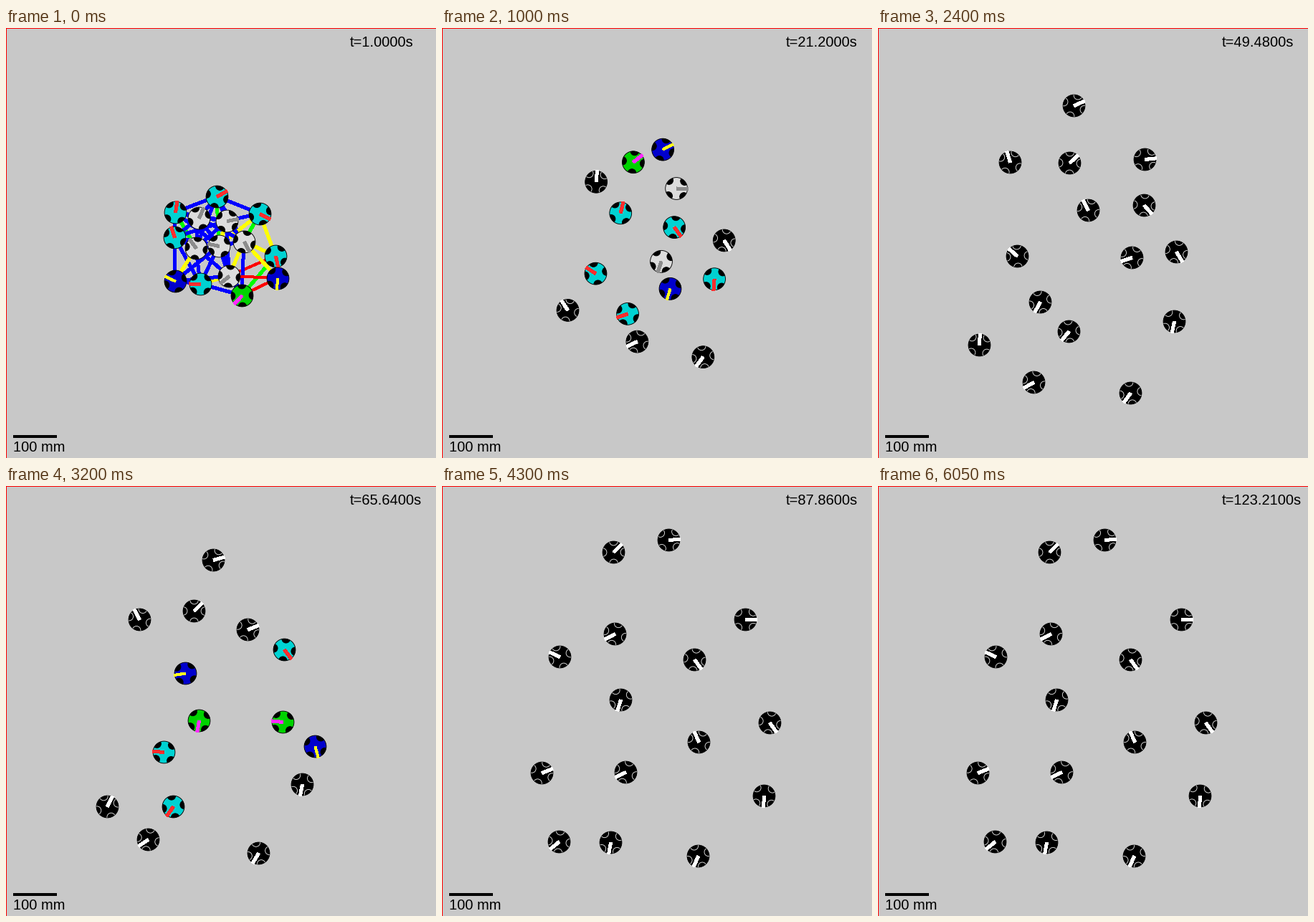
A matplotlib script for the animation above (6100 ms loop, 600x600 px).

```python
from itertools import combinations

import numpy as np
import matplotlib.pyplot as plt
from matplotlib.animation import FuncAnimation
from matplotlib.patches import Circle, Rectangle

SIZE, DPI = 600, 100
FRAMES, STEP_MS = 122, 50
PX = 72 / DPI
RADIUS, NOTCH = 15.4, 5.8
CENTRE = np.array([300, 300])
START_LEAD = -65
REACH = 79
TIMES = [0, 29, 48, 64, 86]
STATE_ENDS = [6, 20, 39, 56, 75]


def rgb(r, g, b):
    return r / 255, g / 255, b / 255


# state: body colour, heading colour, heading width
STYLE = {
    "C": (rgb(0, 210, 210), rgb(255, 45, 45), 4),
    "B": (rgb(0, 0, 205), rgb(255, 255, 30), 3),
    "G": (rgb(0, 210, 0), rgb(255, 45, 255), 4),
    "W": (rgb(220, 220, 220), rgb(140, 140, 140), 4),
    "K": (rgb(0, 0, 0), rgb(255, 255, 255), 4),
}


class Bot:
    """Walks through a few points, turned by a lead from its outward bearing."""

    def __init__(self, states, lead, *points):
        self.states, self.lead = states, lead
        self.track = np.array(points).T

    def at(self, k):
        return np.array([np.interp(k, TIMES, axis) for axis in self.track])

    def heading(self, k):
        dx, dy = self.at(k) - CENTRE
        lead = np.interp(k, [0, TIMES[-1]], [START_LEAD, self.lead])
        return np.arctan2(-dy, dx) + np.radians(lead)

    def state(self, k):
        return self.states[np.searchsorted(STATE_ENDS, k)]


bots = [
    Bot("CGBKKK", -81, (294, 235), (254, 165), (273, 108), (289, 103), (316, 75)),
    Bot("CKCKKK", 0, (236, 257), (205, 195), (184, 187), (186, 186), (164, 238)),
    Bot("CCGKGK", -202, (354, 259), (310, 286), (354, 320), (386, 329), (358, 357)),
    Bot("CKKKKK", -190, (235, 292), (148, 439), (141, 442), (141, 447), (139, 400)),
    Bot("CKKKBK", -44, (376, 318), (401, 286), (416, 312), (431, 363), (457, 330)),
    Bot("CCKKCK", 8, (271, 357), (253, 417), (266, 423), (233, 447), (235, 497)),
    Bot("WBKKKK", -42, (269, 265), (325, 126), (372, 183), (337, 200), (423, 186)),
    Bot("WWKKCK", -102, (308, 269), (335, 203), (371, 247), (388, 228), (352, 242)),
    Bot("WCKKCK", -40, (265, 307), (191, 358), (194, 318), (220, 371), (256, 399)),
    Bot("WCGKKK", -61, (297, 304), (227, 237), (267, 188), (262, 174), (239, 92)),
    Bot("WCKKKK", -52, (332, 298), (401, 373), (413, 409), (413, 416), (449, 432)),
    Bot("WWCKBK", 85, (311, 346), (303, 316), (293, 254), (250, 261), (241, 206)),
    Bot("BKKKKK", -16, (236, 353), (288, 475), (217, 494), (198, 493), (163, 496)),
    Bot("BKKKKK", -38, (379, 349), (357, 508), (352, 509), (352, 512), (357, 516)),
    Bot("GBKKGK", 75, (329, 373), (313, 359), (226, 382), (269, 327), (249, 298)),
]

# opening links between neighbours are blue, except these
ODD_LINKS = {
    "yellow": "2-4 4-10 10-11 10-13 2-9 5-11 7-9 8-12",
    "lime": "0-9 1-8 2-10 4-14",
    "red": "4-11 11-13 13-14",
}
odd = {pair: color for color, pairs in ODD_LINKS.items() for pair in pairs.split()}

fig = plt.figure(figsize=(SIZE / DPI, SIZE / DPI), dpi=DPI)
ax = fig.add_axes([0, 0, 1, 1])
ax.set_xlim(0, SIZE)
ax.set_ylim(SIZE, 0)
ax.axis("off")
fig.patch.set_facecolor(rgb(200, 200, 200))

FONT = dict(family="Liberation Sans", fontsize=20.2 * PX, color="black", va="baseline")
moving = []


def bar(x, y, w, h, color):
    ax.add_patch(Rectangle((x, y), w, h, fc=color, lw=0, aa=False, snap=False))


def line(p, q, color, width, z):
    moving.extend(ax.plot([p[0], q[0]], [p[1], q[1]], color=color, lw=width * PX,
                          aa=False, solid_capstyle="butt", zorder=z))


def disc(centre, radius, fill, edge, z, clip=None):
    patch = ax.add_patch(Circle(centre, radius, fc=fill, ec=edge, lw=0.9 * PX, zorder=z))
    if clip:
        patch.set_clip_path(clip)
    moving.append(patch)
    return patch


bar(0, 0, 1, SIZE, "red")
bar(0, 0, SIZE, 1, "red")
bar(10, 568, 61, 4, "black")
ax.text(10, 591, "100 mm", **FONT)
clock = ax.text(480, 26, "", **FONT)


def draw_links():
    for i, j in combinations(range(len(bots)), 2):
        p, q = bots[i].at(0), bots[j].at(0)
        color = odd.get(f"{i}-{j}", "blue")
        if color != "blue" or np.hypot(*(q - p)) < REACH:
            line(p, q, color, 3 if color == "red" else 4, 2)


def draw_bot(bot, k, z):
    centre, heading, state = bot.at(k) + 0.5, bot.heading(k), bot.state(k)
    body, mark, width = STYLE[state]

    def ray(angle, length):
        return centre + length * np.array([np.cos(angle), -np.sin(angle)])

    shell = disc(centre, RADIUS, body, "black", z)
    rim = rgb(225, 225, 225) if state == "K" else "black"
    for corner in np.pi / 4 + np.arange(4) * np.pi / 2:
        disc(ray(heading + corner, RADIUS), NOTCH, "black", rim, z + 0.1, shell)
    line(centre, ray(heading, 16), mark, width, z + 0.2)


def draw(k):
    while moving:
        moving.pop().remove()
    clock.set_text(f"t={1 + 1.01 * k:.4f}s")
    if k == 0:
        draw_links()
    for i, bot in enumerate(bots):
        draw_bot(bot, k, 3 + i)
    return moving


anim = FuncAnimation(fig, draw, frames=FRAMES, interval=STEP_MS,
                     repeat=True, repeat_delay=0, blit=False)
plt.show()
```
